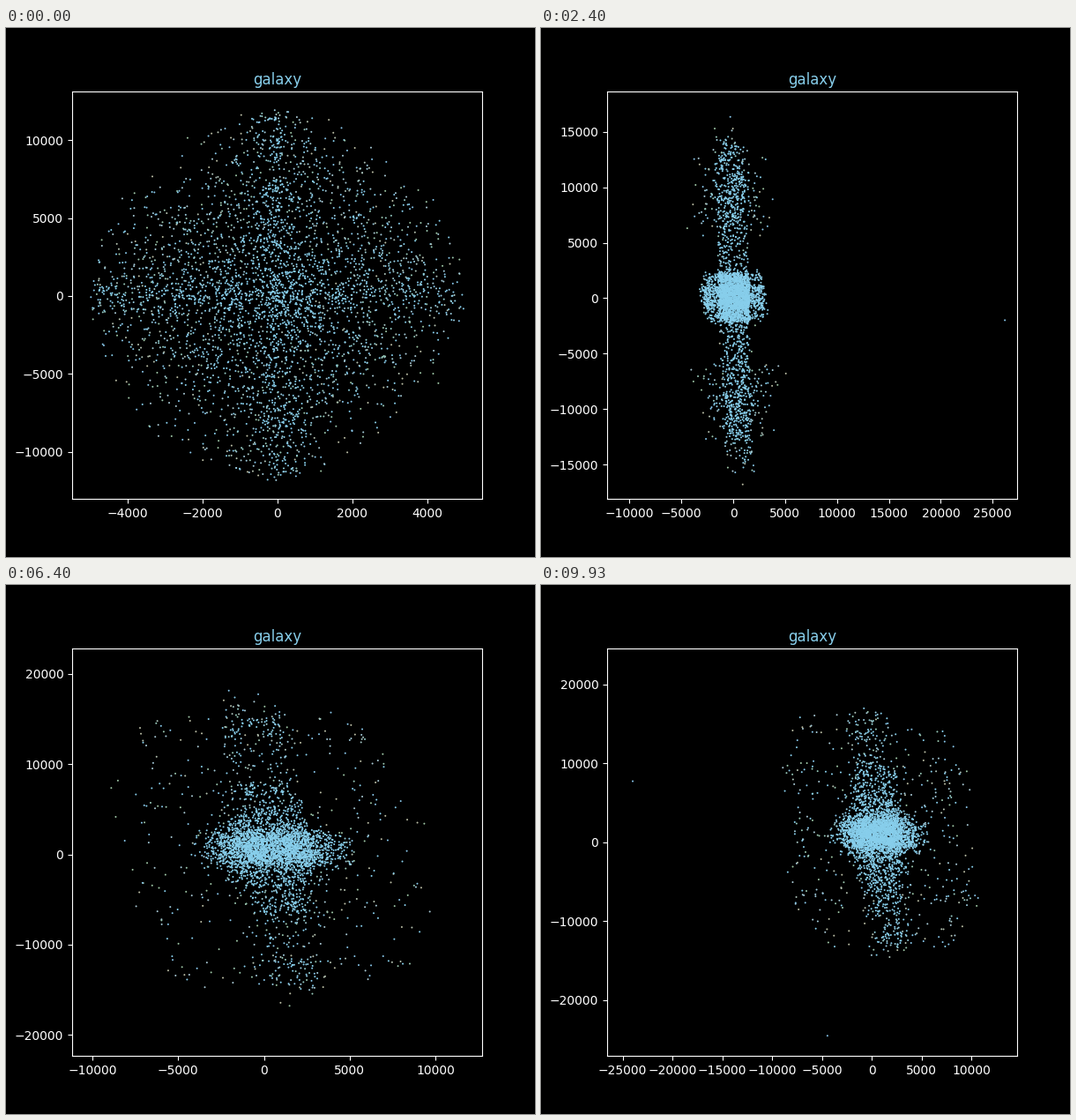
Animation of 600 by 600 pixels, one loop 9.99 s. Source, as a matplotlib script:

```python
import numpy as np
import matplotlib.pyplot as plt
from matplotlib.animation import FuncAnimation
from matplotlib.colors import to_rgb

N = 4000
FRAMES = 150
LOOP_MS = 9990
SKY = "skyblue"
rng = np.random.default_rng(11)


def smooth(u):
    u = np.clip(u, 0, 1)
    return u * u * (3 - 2 * u)


def fit(v, lo, hi):
    return np.interp(v, [v.min(), v.max()], [lo, hi])


# Starting cloud: an ellipse, denser along both axes
theta = rng.uniform(0, 2 * np.pi, N)
x0 = fit(np.cos(theta) * rng.uniform(0, 1, N), -4980, 4962)
y0 = fit(np.sin(theta) * rng.uniform(0, 1, N), -11820, 11930)
p, q = np.abs(x0) / 5000, np.abs(y0) / 12000
shell = p * q > 0.2

# Swing widths after the collapse: off-axis stars form a wide shell
loose = rng.uniform(0, 1, N)
width = np.where(shell,
                 6600 * np.sqrt(1 - 0.64 * q**2) * (0.75 + 0.25 * loose),
                 300 + 1000 * loose + 2200 * p)
height = np.where(shell, 4000 + 10500 * q,
                  300 + 1300 * rng.uniform(0, 1, N) + 16500 * q**2)


class Swing:
    """Fall to the middle, then oscillate; wide swings are slower."""

    def __init__(self, start, reach, rate, full, fall):
        self.start, self.reach = start, reach
        self.fall = fall + np.clip(rng.normal(0, 1.1, N), -2.5, 2.5)
        self.rate = rate * (full / reach)**0.7 * rng.normal(1, 0.06, N)

    def __call__(self, t):
        infall = self.start * np.cos(np.pi / 2 * t / self.fall)
        orbit = -np.sign(self.start) * self.reach * np.sin(self.rate * (t - self.fall))
        return np.where(t < self.fall, infall, orbit)


swing_x = Swing(x0, width, 0.095, 6500, 9)
swing_y = Swing(y0, height, 0.045, 17000, 13)


def runaway(t, reach, rate, start, angle, turn):
    """A star thrown out of the core on a long, slowly turning orbit."""
    r = reach * np.sin(rate * max(t - start, 0))
    return r * np.cos(angle + turn * t), r * np.sin(angle + turn * t)


RUNAWAYS = [
    (30700, 0.038, 9, 0, -0.0021),
    (26000, 0.044, 20, -1.61, 0.0026),
    (25000, 0.040, 112, -1.75, 0),
    (18000, 0.0423, 9, 1.57, 0.0005),
]


def positions(t):
    heat = smooth((t - 50) / 60)
    late = smooth((t - 22) / 30)
    y = swing_y(t) * (1 + 0.15 * heat)
    x = swing_x(t) * (1 + 0.55 * heat) - 0.08 * late * y
    cloud = np.column_stack([x + 5 * t * late, y + 7 * t * late])
    return np.vstack([cloud, [runaway(t, *orbit) for orbit in RUNAWAYS]])


# Visible range: time, left, right, bottom, top
VIEW = np.array([
    (0, -5482, 5459, -13017, 13130),
    (11, -5000, 5500, -7500, 8000),
    (22, -7403, 15094, -9340, 10301),
    (36, -12150, 27358, -18103, 18660),
    (60, -8340, 31850, -27150, 17490),
    (96, -11183, 12725, -22300, 22790),
    (127, -29090, 13182, -17280, 27570),
    (149, -26550, 14600, -27040, 24580),
])


def view(t):
    i = min(np.searchsorted(VIEW[:, 0], t, "right"), len(VIEW) - 1)
    a, b = VIEW[i - 1], VIEW[i]
    return (a + (b - a) * smooth((t - a[0]) / (b[0] - a[0])))[1:]


TINTS = np.array([to_rgb(c) for c in
                  ("#b9bca4", "#9cc4a4", "#a8c8d4", "#87ceeb", "#87c4e8")])
CORE = np.array(to_rgb(SKY))
tint = TINTS[rng.integers(0, len(TINTS), N + len(RUNAWAYS))]
CELLS = 46


def shades(pos, left, right, bottom, top):
    """Crowded stars take on the core colour."""
    unit = (pos - (left, bottom)) / (right - left, top - bottom)
    col, row = np.clip(unit * CELLS, 0, CELLS - 1).astype(int).T
    cell = col * CELLS + row
    crowd = np.clip((np.bincount(cell)[cell] - 1) / 7, 0, 1)[:, None]
    return tint * (1 - crowd) + CORE * crowd


fig = plt.figure(figsize=(6, 6), dpi=100, facecolor="black")
ax = fig.add_axes([0.125, 0.11, 0.775, 0.77], facecolor="black")
ax.set_title("galaxy", color=SKY)
ax.tick_params(colors="white")
for spine in ax.spines.values():
    spine.set_color("white")
stars = ax.scatter(*positions(0).T, s=2.1, linewidths=0)


def draw(i):
    pos = positions(i)
    left, right, bottom, top = view(i)
    ax.set_xlim(left, right)
    ax.set_ylim(bottom, top)
    stars.set_offsets(pos)
    stars.set_facecolor(shades(pos, left, right, bottom, top))
    return stars,


anim = FuncAnimation(fig, draw, frames=FRAMES, interval=LOOP_MS / FRAMES,
                     repeat=True, repeat_delay=0, blit=False)
plt.show()
```
